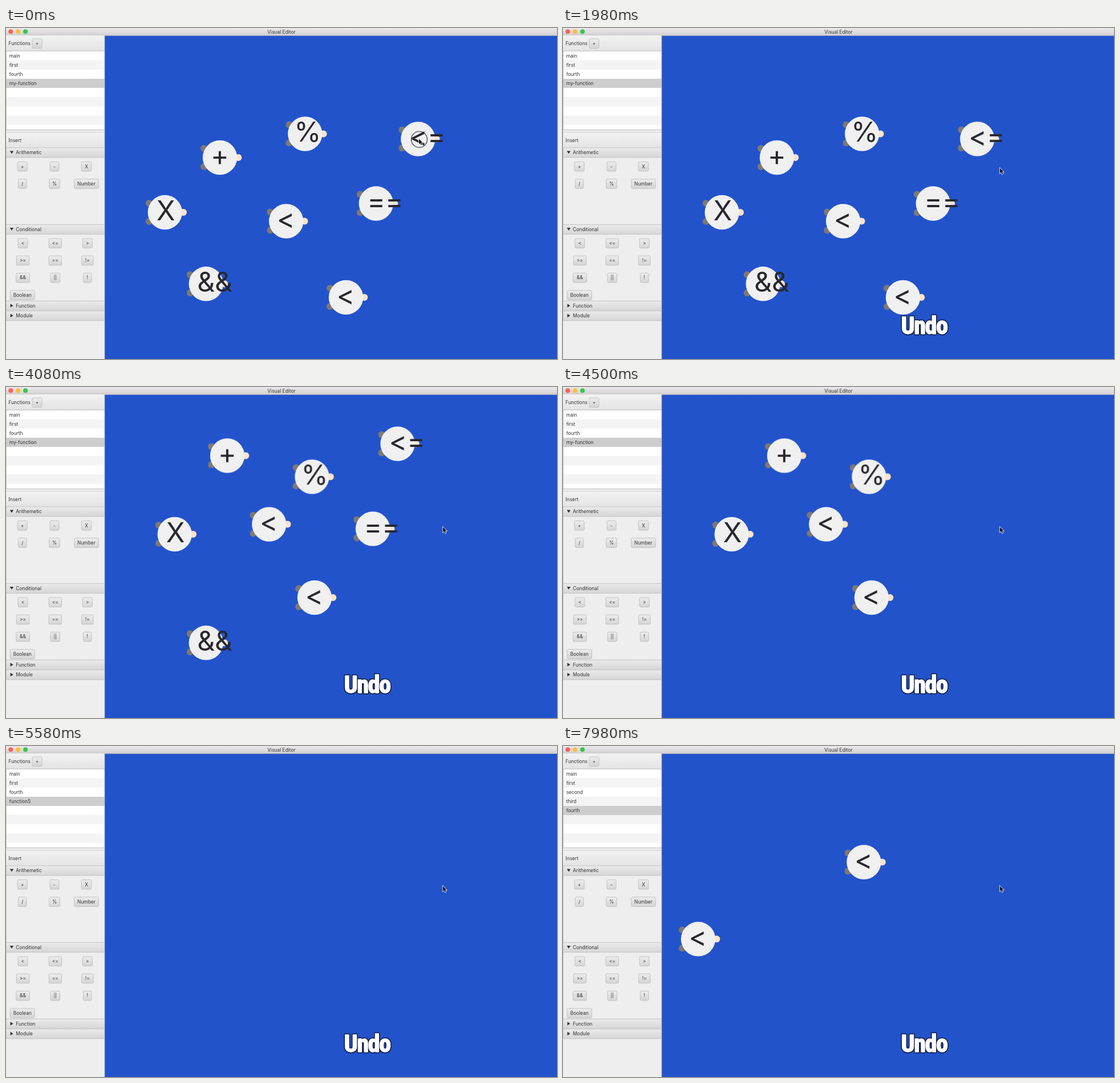
Recreate the animation shown at these times as an HTML page. Size 966 by 580 pixels, loop 8 s.

```html
<!DOCTYPE html>
<html lang="en">
<head>
<meta charset="utf-8">
<title>Visual Editor</title>
<style>
  html, body { margin: 0; width: 100%; height: 100%; overflow: hidden; background: #2253cb; }
  svg { display: block; width: 966px; height: 580px; }
  text { font: 8.4px Inter, Roboto, sans-serif; font-feature-settings: "calt" 0; fill: #333; white-space: pre; }
  .mid { text-anchor: middle; }
  .symbol { font-size: 48px; fill: #27272d; }
  .caption {
    font: 900 42px "Roboto Condensed", "Open Sans Condensed", "DejaVu Sans Condensed", Roboto, sans-serif;
    font-stretch: condensed; letter-spacing: -1.2px; text-anchor: middle;
    fill: #fff; stroke-linejoin: round;
  }
</style>
</head>
<body>
<svg id="stage" viewBox="0 0 966 580" xmlns="http://www.w3.org/2000/svg">
  <defs>
    <linearGradient id="title" x2="0" y2="1"><stop stop-color="#ebe9eb"/><stop offset="1" stop-color="#d1cfd1"/></linearGradient>
    <linearGradient id="bar" x2="0" y2="1"><stop stop-color="#f2f2f2"/><stop offset="1" stop-color="#e4e4e4"/></linearGradient>
    <linearGradient id="head" x2="0" y2="1"><stop stop-color="#ebebeb"/><stop offset="1" stop-color="#d6d6d6"/></linearGradient>
    <linearGradient id="key" x2="0" y2="1"><stop stop-color="#ececec"/><stop offset="1" stop-color="#d5d5d5"/></linearGradient>
    <clipPath id="listClip"><rect x="0" y="40" width="173" height="138.5"/></clipPath>
  </defs>
</svg>
<script>
const LOOP = 8000;
const stage = document.getElementById('stage');
const pen = document.createElement('canvas').getContext('2d');

function add(parent, tag, attrs, text) {
  const el = document.createElementNS(stage.namespaceURI, tag);
  for (const k in attrs) el.setAttribute(k, attrs[k]);
  if (text !== undefined) el.textContent = text;
  parent.append(el);
  return el;
}
const box = (p, x, y, width, height, fill, more) => add(p, 'rect', { x, y, width, height, fill, ...more });
const dot = (p, cx, cy, r, fill, more) => add(p, 'circle', { cx, cy, r, fill, ...more });
const label = (p, x, y, text, cls = '') => add(p, 'text', { x, y, class: cls }, text);
const line = (y, color = '#bdbdbd') => box(stage, 0, y, 173, 1, color);

function run(el, frames) {
  const anim = el.animate(frames, { duration: LOOP, iterations: Infinity });
  anim.startTime = 0;
}

// rows: [time, x, y], moving evenly from one to the next
function move(el, rows) {
  const all = [[0, ...rows[0].slice(1)], ...rows, [LOOP, ...rows.at(-1).slice(1)]];
  run(el, all.map(([t, x, y]) => ({ offset: t / LOOP, transform: `translate(${x}px, ${y}px)` })));
}

function show(el, from, to) {
  const at = (t, on) => ({ offset: t / LOOP, opacity: on, easing: 'step-end' });
  const frames = [at(0, from > 0 ? 0 : 1)];
  if (from > 0) frames.push(at(from, 1));
  if (to < LOOP) frames.push(at(to, 0));
  frames.push(at(LOOP, to < LOOP ? 0 : 1));
  run(el, frames);
}

function button(cx, cy, w, text) {
  box(stage, cx - w / 2, cy - 8, w, 16.5, 'url(#key)', { rx: 1.8, stroke: '#b9b9b9', 'stroke-width': .8 });
  label(stage, cx, cy + 3, text, 'mid');
}

function header(y, text, open) {
  box(stage, 0, y, 173, 17.5, 'url(#head)');
  line(y, '#c2c2c2');
  line(y + 17, '#c2c2c2');
  const c = y + 8.7;
  const d = open ? `M6.8 ${c - 2.6}h6.4l-3.2 5z` : `M7.6 ${c - 3.2}v6.4l5-3.2z`;
  add(stage, 'path', { d, fill: '#333' });
  label(stage, 17.3, y + 11.8, text);
}

function sidebar() {
  box(stage, 0, 13, 173, 567, '#eeeeee');
  box(stage, 0, 13, 173, 27, 'url(#bar)');
  label(stage, 4.5, 30.3, 'Functions');
  button(54.5, 27, 17, '+');

  const lists = [
    [0, 'main first fourth my-function'],
    [5520, 'main first fourth function5'],
    [5700, 'main first third fourth function5'],
    [5940, 'main first second third fourth function5'],
    [6660, 'main first second third fourth'],
    [LOOP]
  ];
  const list = add(stage, 'g', { 'clip-path': 'url(#listClip)' });
  lists.slice(0, -1).forEach(([from, names], n) => {
    const g = add(list, 'g');
    const items = names.split(' ');
    for (let i = 0; i < 9; i++) {
      const y = 40.5 + i * 16.13;
      const fill = i === items.length - 1 ? '#cdcdcd' : i % 2 ? '#f4f4f4' : '#ffffff';
      box(g, 0, y, 173, 16.2, fill);
      if (items[i]) label(g, 5.7, y + 11, items[i]);
    }
    show(g, from, lists[n + 1][0]);
  });
  line(39.7);
  line(178);
  line(182.5, '#c4c4c4');
  box(stage, 0, 40, .8, 138, '#bdbdbd');

  box(stage, 0, 183.5, 173, 26, 'url(#bar)');
  label(stage, 4.5, 199.8, 'Insert');
  header(209.3, 'Arithemetic', true);
  header(343.8, 'Conditional', true);
  header(477.8, 'Function', false);
  header(495.3, 'Module', false);

  [[28.7, 242.5, 17, '+'], [85, 242.5, 16, '-'], [141, 242.5, 17.5, 'X'],
   [28.7, 272.7, 14.5, '/'], [85, 272.7, 18.5, '%'], [141, 272.7, 42.5, 'Number'],
   [29.5, 377, 17, '<'], [86.3, 377, 22.5, '<='], [142.8, 377, 17, '>'],
   [29.5, 407.2, 22.5, '>='], [86.3, 407.2, 22.5, '=='], [142.8, 407.2, 20.5, '!='],
   [29.5, 437.4, 23.5, '&&'], [86.3, 437.4, 16.5, '||'], [142.8, 437.4, 14.5, '!'],
   [28.8, 467.8, 43, 'Boolean']].forEach(b => button(...b));
  box(stage, 172.3, 13, 1, 567, '#c3c3c3');
  box(stage, 0, 209, .8, 304, '#c6c6c6');
}

function titleBar() {
  box(stage, 0, 0, 966, 13.5, 'url(#title)');
  box(stage, 0, 12.8, 966, .7, '#b4b2b4');
  ['#fc605b', '#fdbc40', '#34c84a'].forEach((c, i) => dot(stage, 8.3 + 12.9 * i, 6.3, 4, c));
  label(stage, 483, 9.5, 'Visual Editor', 'mid');
}

// Left edge of the ink, relative to the node centre
const INK = { '+': -12, '<': -12.5, 'X': -14, '%': -14, '==': -10.5, '&&': -13.5, '<=': -11 };

function node(text, from, to, rows) {
  const g = add(stage, 'g');
  dot(g, -28, -16, 6, '#7b7978');
  dot(g, -28, 16, 6, '#7b7978');
  dot(g, 32.3, 0, 6, '#fde4c6');
  dot(g, 0, 0, 30.2, '#f0f0f0');
  pen.font = '48px Inter, Roboto, sans-serif';
  const m = pen.measureText(text);
  const lift = /[X%&]/.test(text) ? -3.7 : -.3;
  const y = lift + (m.actualBoundingBoxAscent - m.actualBoundingBoxDescent) / 2;
  label(g, INK[text] + m.actualBoundingBoxLeft, y, text, 'symbol');
  move(g, rows);
  show(g, from, to);
}

function nodes() {
  node('X', 0, 4740, [[3600, 278.7, 323], [3720, 295.7, 258]]);
  node('+', 0, 4860, [[3420, 375, 227], [3570, 388, 120.3]]);
  node('%', 0, 4620, [[3300, 524.3, 185.5], [3400, 536.5, 157.3]]);
  node('<', 0, 5340, [[3900, 491.2, 338.5], [4050, 461.3, 240.5]]);
  node('<', 0, 5160, [[3740, 596, 472], [3880, 541, 369]]);
  node('==', 0, 4380, [[2700, 648.8, 307.5], [3240, 643, 248.5]]);
  node('&&', 0, 4260, [[0, 350.7, 448.3]]);
  node('<=', 0, 4500, [
    [0, 722.3, 194.5], [60, 726, 194.5], [480, 753, 237], [1740, 753, 237],
    [1980, 726.3, 194.5], [2640, 686.5, 99.5]
  ]);
  node('<', 6660, LOOP, [[0, 527.5, 203.5]]);
  node('<', 6660, LOOP, [[0, 237, 338.3]]);
}

function caption() {
  const g = add(stage, 'g');
  const layers = [['#14244f', 5], ['#fff', 1.6]].map(([stroke, w]) => {
    const t = label(g, 633.3, 536.3, 'Undo', 'caption');
    t.style.stroke = stroke;
    t.style.strokeWidth = w;
    return t;
  });
  const size = Math.min(42, 42 * 81 / layers[0].getComputedTextLength());
  layers.forEach(t => t.style.fontSize = size + 'px');
  show(g, 780, LOOP);
}

function pointer() {
  const g = add(stage, 'g');
  const ring = dot(g, .5, 1, 14, 'none', { stroke: '#20242e', 'stroke-width': 1.1 });
  show(ring, 0, 480);
  add(g, 'path', {
    d: 'M0 0V9.2L2.1 7.3 3.7 10.8 5.3 10.1 3.8 6.7H6.5Z',
    fill: '#111', stroke: '#fff', 'stroke-width': 1.4, 'paint-order': 'stroke'
  });
  move(g, [[0, 724, 194.3], [60, 727.8, 194.3], [480, 754.8, 237], [720, 766, 245.3]]);
}

titleBar();
sidebar();
nodes();
caption();
pointer();
</script>
</body>
</html>
```
